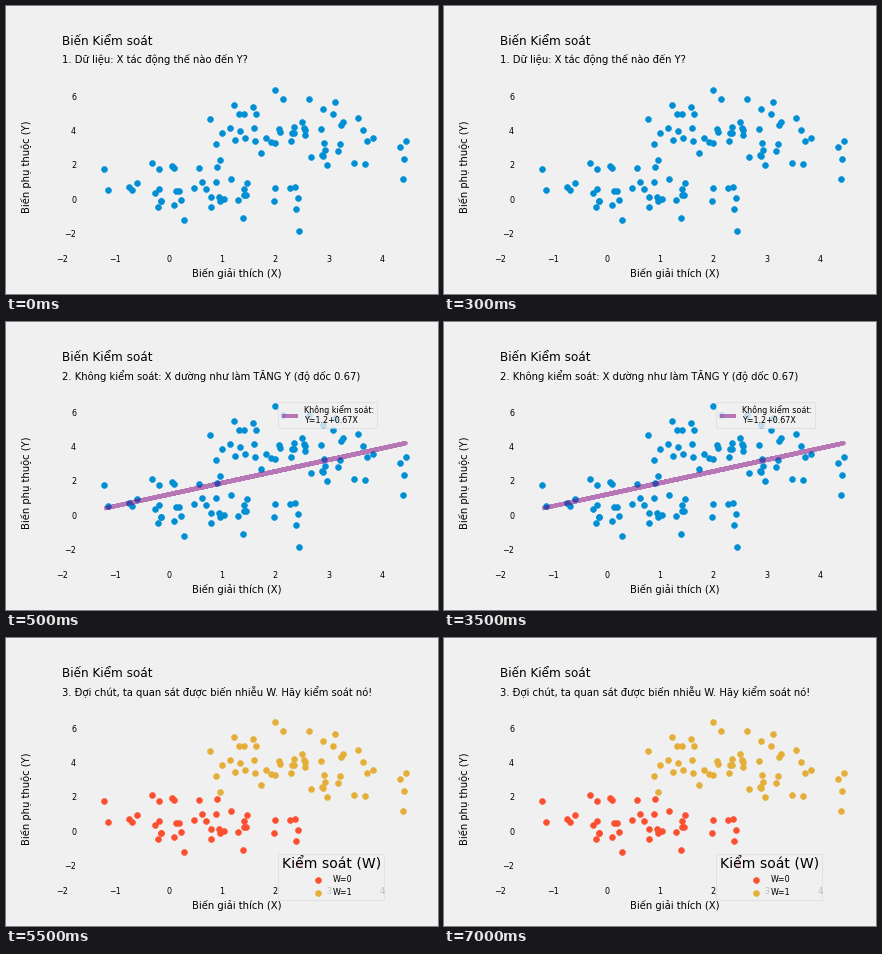
Write a matplotlib script that moves like this. It is 432 by 288 pixels and loops after 8 s.

```python
import matplotlib.pyplot as plt
from matplotlib.animation import FuncAnimation
import numpy as np

W, H, DPI = 432, 288, 72
STEP, FRAMES = 500, 16
BG, BLUE, RED, YELLOW = "#f0f0f0", "#008fd5", "#fc4f30", "#e5ae38"

plt.rcParams.update({
    "font.family": "DejaVu Sans",
    "patch.linewidth": 0.5,
    "lines.solid_capstyle": "butt",
    "axes.facecolor": BG,
})

SUBTITLES = [
    "1. Dữ liệu: X tác động thế nào đến Y?",
    "2. Không kiểm soát: X dường như làm TĂNG Y (độ dốc 0.67)",
    "3. Đợi chút, ta quan sát được biến nhiễu W. Hãy kiểm soát nó!",
]

# The confounder raises both variables, while X itself lowers Y
rng = np.random.RandomState(0)
group = rng.randint(0, 2, 100)
x = 0.5 + 2 * group + rng.normal(size=100)
y = 1 - 0.5 * x + 4 * group + rng.normal(size=100)
slope, base = np.polyfit(x, y, 1)

fig = plt.figure(figsize=(W / DPI, H / DPI), dpi=DPI, facecolor=BG)
ax = fig.add_axes([0, 0, 1, 1])


def sx(v):
    return 162.55 + 53.33 * v


def sy(v):
    return 193.2 - 17.13 * v


def label(px, py, text, size, ha="left", va="baseline", **kw):
    ax.text(px, py, text, size=size, ha=ha, va=va, color="black",
            zorder=2, **kw)


def dots(mask, color, name=None):
    ax.scatter(sx(x[mask]), sy(y[mask]), s=36, color=color, label=name)


def legend(px, py, **kw):
    ax.legend(loc="upper left", bbox_to_anchor=(px, py),
              bbox_transform=ax.transData, borderaxespad=0, fontsize=8,
              framealpha=0.8, **kw)


def frame_text(stage):
    label(sx(-2), 39, "Biến Kiểm soát", 12)
    label(sx(-2), 57 if stage == 0 else 58, SUBTITLES[stage], 10)
    label(231, 271, "Biến giải thích (X)", 10, "center")
    label(24, 161, "Biến phụ thuộc (Y)", 10, "center",
          rotation=90, rotation_mode="anchor")
    for v in range(-2, 5):
        label(sx(v), 256, str(v).replace("-", "−"), 8, "center")
    for v in range(-2, 7, 2):
        label(70, sy(v), str(v).replace("-", "−"), 8, "right",
              "center_baseline")


def draw(i):
    t = i * STEP
    stage = 0 if t < 500 else 1 if t < 5500 else 2
    ax.clear()
    ax.set(xlim=(0, W), ylim=(H, 0))
    ax.axis("off")
    frame_text(stage)

    if stage < 2:
        dots(group >= 0, BLUE)
    else:
        dots(group == 0, RED, "W=0")
        dots(group == 1, YELLOW, "W=1")
        legend(272.4, 215.5, title="Kiểm soát (W)", title_fontsize=14)

    if stage == 1:
        ax.plot(sx(x), sy(base + slope * x), color="purple", alpha=0.5, lw=4,
                label=f"Không kiểm soát:\nY={base:.1f}+{slope:.2f}X")
        legend(272.4, 79.6)
    return []


anim = FuncAnimation(fig, draw, frames=FRAMES, init_func=lambda: draw(0),
                     interval=STEP, repeat=True, repeat_delay=0)
plt.show()
```
